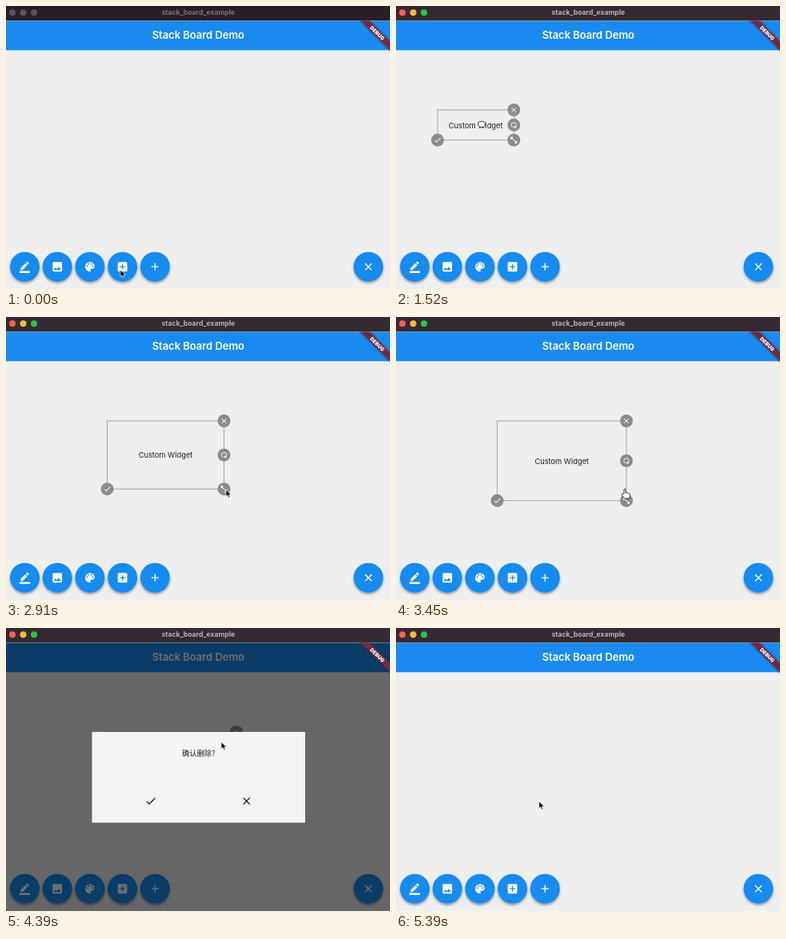
An HTML page that plays this animation: 480 px wide and 354 px high, repeating every 5.97 s.

```html
<!DOCTYPE html>
<html>
<head>
<meta charset="utf-8">
<style>
  html, body { margin: 0; width: 100%; height: 100%; overflow: hidden; background: #eee; }
  svg { display: block; font-family: Inter, Roboto, sans-serif; }
  text { text-anchor: middle; }
</style>
</head>
<body>
<svg id="stage" width="480" height="354" viewBox="0 0 480 354"></svg>
<script>
const LOOP = 5970, TOP = 18.4;

// Material icons on a 24 unit grid
const ICONS = {
  pen: 'M22 24H2v-4h20zM13.06 5.19l3.75 3.75L7.75 18H4v-3.75zM17.88 7.87l-3.75-3.75 1.83-1.83c.39-.39 1.02-.39 1.41 0l2.34 2.34c.39.39.39 1.02 0 1.41z',
  image: 'M21 19V5c0-1.1-.9-2-2-2H5c-1.1 0-2 .9-2 2v14c0 1.1.9 2 2 2h14c1.1 0 2-.9 2-2zM8.5 13.5l2.5 3.01L14.5 12l4.5 6H5z',
  palette: 'M12 3a9 9 0 0 0 0 18c.83 0 1.5-.67 1.5-1.5 0-.39-.15-.74-.39-1.01-.23-.26-.38-.61-.38-.99 0-.83.67-1.5 1.5-1.5H16c2.76 0 5-2.24 5-5 0-4.42-4.03-8-9-8z' +
    [[6.5, 10.5], [9.5, 6.5], [14.5, 6.5], [17.5, 10.5]]
      .map(([x, y]) => `M${x - 1.5} ${y}a1.5 1.5 0 0 0 3 0a1.5 1.5 0 0 0-3 0z`).join(''),
  addBox: 'M19 3H5c-1.11 0-2 .9-2 2v14c0 1.1.89 2 2 2h14c1.1 0 2-.9 2-2V5c0-1.1-.9-2-2-2zm-2 10h-4v4h-2v-4H7v-2h4V7h2v4h4z',
  add: 'M19 13h-6v6h-2v-6H5v-2h6V5h2v6h6z',
  close: 'M19 6.41L17.59 5 12 10.59 6.41 5 5 6.41 10.59 12 5 17.59 6.41 19 12 13.41 17.59 19 19 17.59 13.41 12z',
  check: 'M9 16.17L4.83 12l-1.42 1.41L9 19 21 7l-1.41-1.41z',
  rotate: 'M17.65 6.35A8 8 0 1 0 19.73 14h-2.08A6 6 0 1 1 16.22 7.78L13 11h7V4z',
  resize: 'M21 11V3h-8l3.29 3.29-10 10L3 13v8h8l-3.29-3.29 10-10z'
};

const icon = (name, x, y, size, fill, turn = 0) =>
  `<path d="${ICONS[name]}" fill="${fill}" fill-rule="evenodd"
    transform="translate(${x} ${y}) rotate(${turn}) scale(${size / 24}) translate(-12 -12)"/>`;

const fab = (name, x) =>
  `<circle cx="${x}" cy="326.2" r="18.5" fill="#198bf0" filter="url(#lift)"/>` +
  icon(name, x, 326.2, 15.8, '#fff');

const handle = (id, name, turn) =>
  `<g id="${id}"><circle r="8" fill="#8c8c8c"/>${icon(name, 0, 0, 10.6, '#fff', turn)}</g>`;

const $ = id => document.getElementById(id);

$('stage').innerHTML = `
  <defs>
    <filter id="lift" x="-30%" y="-30%" width="160%" height="170%">
      <feDropShadow dx="0" dy="2" stdDeviation="1.8" flood-opacity=".38"/>
    </filter>
    <filter id="soft" x="-20%" y="-60%" width="140%" height="220%">
      <feDropShadow dx="0" dy="0" stdDeviation="1.6" flood-opacity=".5"/>
    </filter>
    <clipPath id="app"><rect y="${TOP}" width="480" height="336"/></clipPath>
  </defs>
  <rect width="480" height="354" fill="#eee"/>
  <g clip-path="url(#app)">
    <rect y="${TOP}" width="480" height="36.9" fill="#198bf0"/>
    <text x="240.3" y="41.3" font-size="12.95" font-weight="600" fill="#fff">Stack Board Demo</text>
    <g id="item">
      <rect id="frame" fill="none" stroke="#a6a6a6"/>
      <text id="label" font-size="9.3" fill="#222">Custom Widget</text>
      ${handle('del', 'close', 0)}${handle('spin', 'rotate', 90)}
      ${handle('size', 'resize', 90)}${handle('done', 'check', 0)}
    </g>
    ${['pen', 'image', 'palette', 'addBox', 'add'].map((n, i) => fab(n, 23.5 + 40.7 * i)).join('')}
    ${fab('close', 453)}
    <rect id="scrim" y="${TOP}" width="480" height="336"/>
    <g id="dialog">
      <rect x="107.5" y="130" width="266.5" height="113.5" fill="#f4f4f4"/>
      <text x="240.7" y="160" font-size="9.3" fill="#222"
        style="font-family:'Noto Sans CJK SC','Noto Sans CJK',sans-serif">确认删除?</text>
      <circle id="hover" cx="181" cy="216.5" r="23.5" fill="#e3e4e4"/>
      ${icon('check', 181, 216.5, 15.8, '#222')}
      ${icon('close', 300.7, 216.5, 15.8, '#222')}
    </g>
    <g transform="translate(480 18) rotate(45)">
      <rect x="-40" y="18.5" width="80" height="8" fill="#722b3f" filter="url(#soft)"/>
      <text y="24.8" font-size="6.4" font-weight="900" fill="#fff">DEBUG</text>
    </g>
  </g>
  <rect id="bar" width="480" height="${TOP}"/>
  <g id="lights">${[8, 21.5, 35].map(x => `<circle cx="${x}" cy="8.3" r="4"/>`).join('')}</g>
  <text id="caption" x="240.3" y="11.3" font-size="8.6" font-weight="700">stack_board_example</text>
  <g id="cursor" stroke-linejoin="round">
    <path id="arrow" transform="scale(.85)" d="M0 0v10.2l2.4-2.2 1.7 3.7 1.8-.8-1.7-3.6h3.3z" fill="#000" stroke="#fff" stroke-width=".8"/>
    <path id="hand" d="M-2 6V.5Q-1-1.2 0 .5V4.5l4.5 1.2q1.4.5 1.2 2L5 12H-1.5L-5 7.5q0-1.6 1.4-1.2z" fill="#fff" stroke="#222" stroke-width=".9"/>
    <path id="fist" d="M-4.5-1Q-4.3-3.6-2-3.2 0-4.4 1.8-3.2 4.6-3.2 4.5-.5 4.5 2 3 3.4H-2.6Q-4.5 1.5-4.5-1z" fill="#fff" stroke="#222" stroke-width=".9"/>
  </g>`;

const clamp = v => Math.max(0, Math.min(1, v));

// Eased position along [time, x, y] stops
function track(stops, t) {
  const i = stops.findIndex(s => s[0] > t);
  if (i === 0) return stops[0].slice(1);
  if (i < 0) return stops[stops.length - 1].slice(1);
  const [t0, x0, y0] = stops[i - 1], [t1, x1, y1] = stops[i];
  const u = (t - t0) / (t1 - t0), k = u * u * (3 - 2 * u);
  return [x0 + (x1 - x0) * k, y0 + (y1 - y0) * k];
}

const POINTER = [
  [600, 143, 330], [1180, 63, 81], [1240, 63, 81], [1520, 107, 148], [1760, 181, 148],
  [1880, 181, 148], [2340, 224.5, 168.5], [2520, 224.5, 168.5], [3090, 290.5, 230.5],
  [3120, 290.5, 230.5], [3300, 287, 215], [3450, 287, 215], [4030, 288.8, 126.5],
  [4240, 288.8, 126.5], [4800, 178.8, 217]
];
const CORNER = [[1240, 8, 63], [1520, 52, 130], [1760, 126.5, 130]];
const EXTENT = [[2520, 95.3, 37.7], [3090, 161.5, 99.7]];

const show = (id, on) => $(id).setAttribute('display', on ? 'inline' : 'none');
const move = (id, x, y) => $(id).setAttribute('transform', `translate(${x} ${y})`);
const set = (id, attrs) => {
  for (const k in attrs) $(id).setAttribute(k, attrs[k]);
};

// Dialog opacity: opens abruptly part-way, then eases
function dialogFade(t) {
  if (t < 4230) return 0;
  const opening = 1 - (1 - clamp((t - 4185) / 150)) ** 2;
  return opening * (1 - clamp((t - 5230) / 150));
}

function draw(t) {
  const focused = t >= 240;
  set('bar', { fill: focused ? '#352a33' : '#291e28' });
  set('caption', { fill: focused ? '#b9b1b7' : '#796e77' });
  ['#fe5f57', '#febc2e', '#28c840'].forEach((c, i) =>
    $('lights').children[i].setAttribute('fill', focused ? c : '#5b515a'));

  const [x, y] = track(CORNER, t), [w, h] = track(EXTENT, t);
  show('item', t >= 510 && t < 5060);
  set('frame', { x, y, width: w, height: h });
  set('label', { x: x + w / 2, y: y + h / 2 + 3.7 });
  move('del', x + w, y);
  move('spin', x + w, y + h / 2);
  move('size', x + w, y + h);
  move('done', x, y + h);

  const fade = dialogFade(t);
  set('scrim', { opacity: fade * .57 });
  set('dialog', { opacity: fade });
  show('hover', t >= 4680);

  const [px, py] = track(POINTER, t);
  const fist = t >= 1240 && t < 1790;
  const hand = !fist && (t >= 1090 && t < 2190 || t >= 3240 && t < 3900);
  move('cursor', px, py);
  show('fist', fist);
  show('hand', hand);
  show('arrow', !fist && !hand);
}

function tick() {
  draw(performance.now() % LOOP);
  requestAnimationFrame(tick);
}
tick();
</script>
</body>
</html>
```
